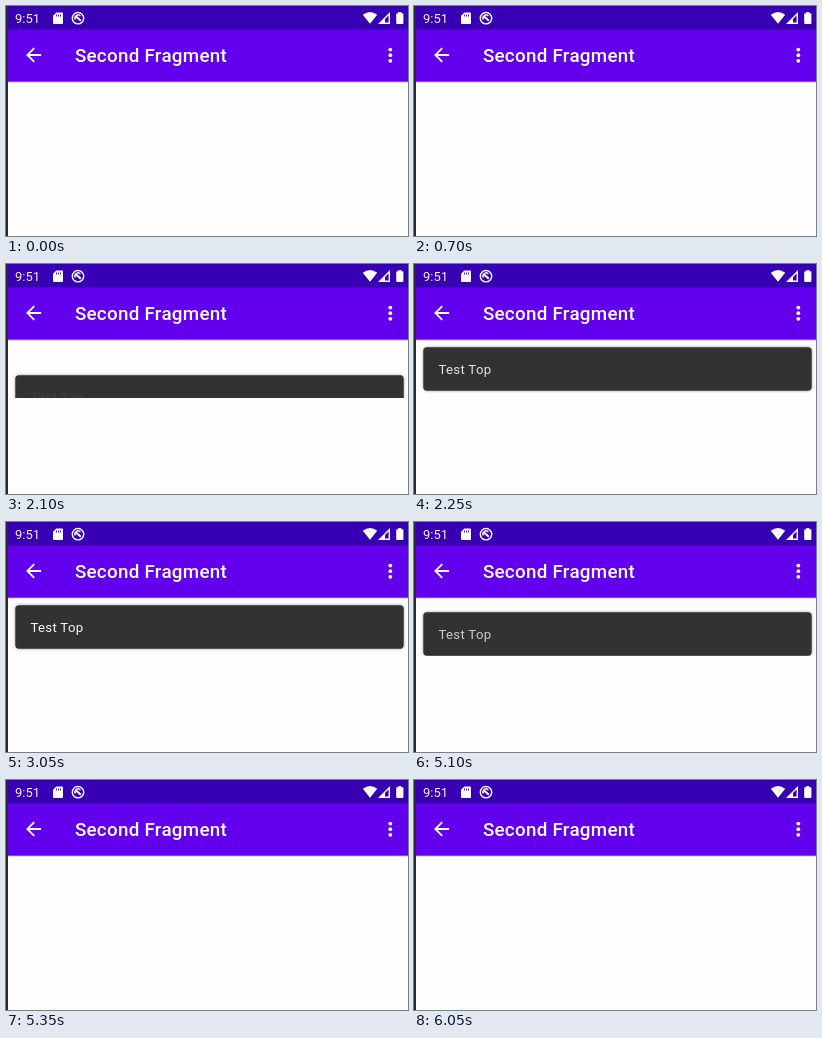
These frames come from a looping animation (402 px wide and 230 px high, 6.5 s). An HTML page:

```html
<!DOCTYPE html>
<html lang="en">
<head>
<meta charset="utf-8">
<style>
  html, body { margin: 0; width: 100%; height: 100%; overflow: hidden; }
  svg { display: block; width: 402px; height: 230px; font-family: Roboto, sans-serif; }
  #bar rect { filter: drop-shadow(0 .5px 1.8px rgba(0, 0, 0, .4)); }
</style>
</head>
<body>
<svg viewBox="0 0 402 230">
  <defs><clipPath id="window"><path d="M2 76h400v58H2z"/></clipPath></defs>
  <rect width="402" height="230" fill="#fefefe"/>
  <rect width="402" height="24" fill="#3700b3"/>
  <rect y="75.500" width="402" height="1.300" opacity=".15"/>
  <rect y="23.400" width="402" height="52.300" fill="#6200ee"/>

  <!-- status bar -->
  <g fill="#fff">
    <text x="9" y="17" font-size="13" fill="#f2effa">9:51</text>
    <path fill-rule="evenodd" d="M50.300 6.500H56q1 0 1 1v9.500q0 1-1 1h-8q-1 0-1-1V9.800zM50 8.500v2h.9v-2zM52 8.500v2h.9v-2zM54 8.500v2h.9v-2z"/>
    <g fill="none" stroke="#fff" stroke-width="1.400">
      <circle cx="72" cy="12.200" r="5.700"/>
      <path d="M69.400 13.500a3 3 0 0 1 5-3.300"/>
      <path d="M69.800 10.200l5 4.600" stroke-width="1.900"/>
    </g>
    <path d="M356.800 8.700q7.200-5.400 14.400 0L364 17.700z"/>
    <path d="M384 6v12h-12z"/>
    <path d="M382.600 9.500v7h-3.600v-3.400z" fill="#3700b3"/>
    <path d="M392.300 6h3v1.200h1.200q.9 0 .9.9v9q0 .9-.9.9h-5.400q-.9 0-.9-.9v-9q0-.9.9-.9h1.200z"/>
  </g>

  <!-- toolbar -->
  <g fill="#fff">
    <path transform="translate(16.300 37.700) scale(.94)" d="M20 11H7.830l5.590-5.590L12 4l-8 8 8 8 1.410-1.410L7.830 13H20z"/>
    <text x="68.900" y="56.200" font-size="18.800" font-weight="500" letter-spacing=".27">Second Fragment</text>
    <circle cx="384.300" cy="43.600" r="1.900"/>
    <circle cx="384.300" cy="49.200" r="1.900"/>
    <circle cx="384.300" cy="54.800" r="1.900"/>
  </g>

  <g clip-path="url(#window)">
    <g id="bar">
      <rect x="9.300" y="83.200" width="388.400" height="43.500" rx="3.700" fill="#323232"/>
      <text id="label" x="24.400" y="110" font-size="13.200" letter-spacing=".32" fill="#f6f6f6">Test Top</text>
    </g>
  </g>
  <path d="M0 0h2v230H0z" fill="#2b2b2d"/>
</svg>
<script>
const LOOP = 6500, STEP = 50, TRAVEL = 51, SLIDE = 250;
const bar = document.getElementById('bar');
const label = document.getElementById('label');
const clamp = v => Math.min(1, Math.max(0, v));

// cubic-bezier(.4, 0, .2, 1), solved by bisection
function ease(x) {
  let lo = 0, hi = 1, u = .5;
  for (let i = 0; i < 20; i++) {
    u = (lo + hi) / 2;
    const bx = 1.2 * u * (1 - u) ** 2 + .6 * u * u * (1 - u) + u ** 3;
    if (bx < x) lo = u; else hi = u;
  }
  return u * u * (3 - 2 * u);
}

function draw(now) {
  const t = Math.floor(now % LOOP / STEP) * STEP;
  let drop, alpha;
  if (t < 5100) {
    const age = t - 2018;
    drop = 1 - ease(clamp(age / SLIDE));
    alpha = clamp((age - 70) / 180);
  } else {
    // half-speed exit, stalled at 5200 until the bar is removed
    const age = (Math.min(t, 5200) - 5000) / 2;
    drop = ease(clamp(age / SLIDE));
    alpha = 1 - clamp(age / 230);
  }
  bar.setAttribute('visibility', t >= 2100 && t < 5350 ? 'visible' : 'hidden');
  bar.setAttribute('transform', `translate(0 ${Math.round(drop * TRAVEL)})`);
  label.setAttribute('opacity', alpha);
}

const start = performance.now();
function tick() {
  draw(performance.now() - start);
  requestAnimationFrame(tick);
}
tick();
</script>
</body>
</html>
```
